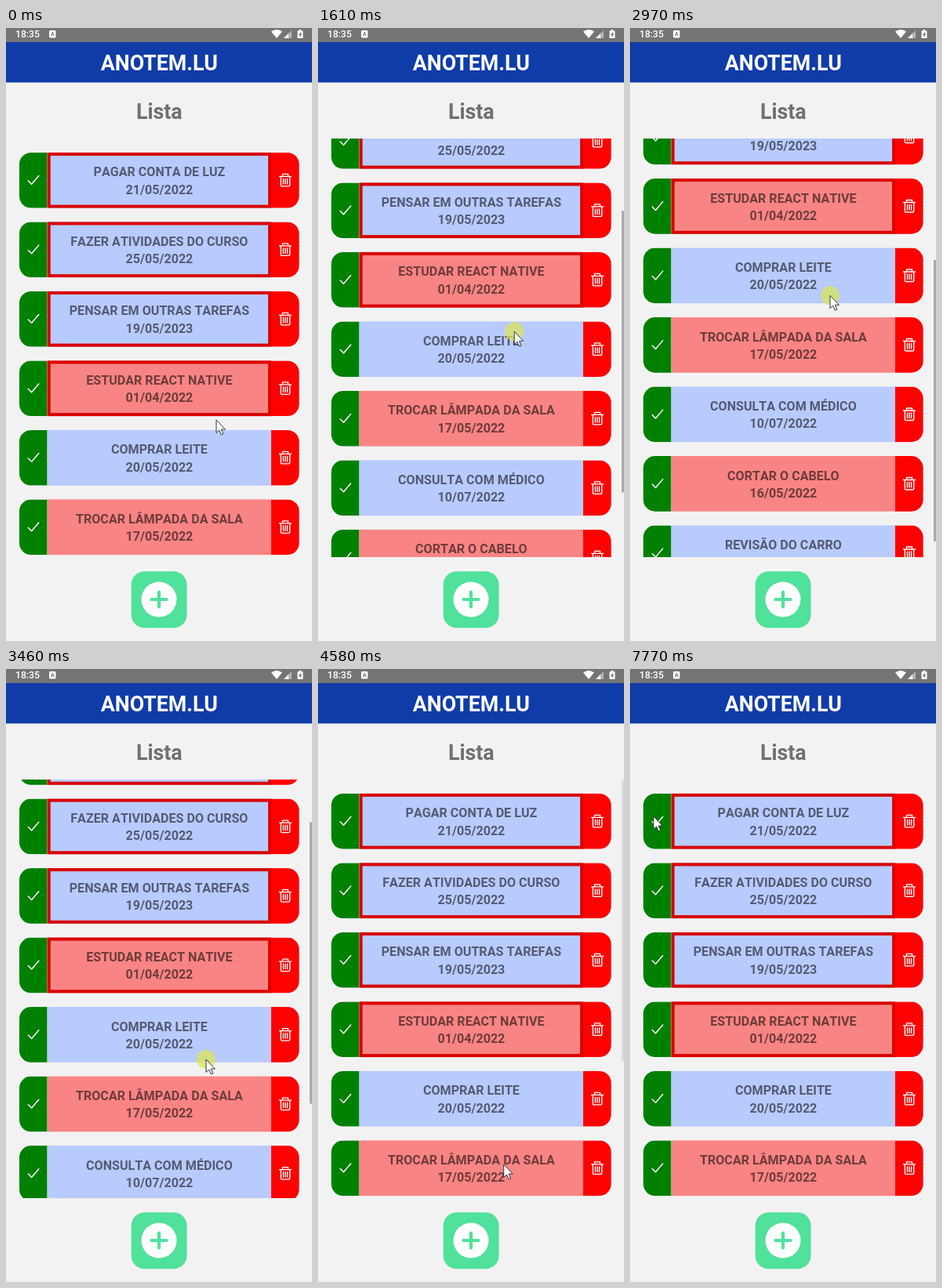
These frames come from a looping animation (390 by 782 pixels, 8 s). An HTML page:

```html
<!DOCTYPE html>
<html lang="pt-BR">
<head>
<meta charset="utf-8">
<title>Lista</title>
<style>
  html, body { margin: 0; width: 100%; height: 100%; overflow: hidden; background: #f2f2f2; }
  svg { display: block; width: 390px; height: 782px; font-family: Roboto, Arial, sans-serif; font-weight: 700; }
  .mid { text-anchor: middle; }
  .row text { font-size: 16.1px; font-kerning: none; fill: #000; fill-opacity: .55; }
  .line { fill: none; stroke: #fff; stroke-linecap: round; stroke-linejoin: round; }
</style>
</head>
<body>
<svg viewBox="0 0 390 782">
  <defs>
    <clipPath id="view"><rect y="141" width="390" height="534"/></clipPath>
    <clipPath id="round"><rect x="17" width="356.6" height="70.7" rx="15"/></clipPath>
    <g id="buttons">
      <g clip-path="url(#round)">
        <rect x="17" width="35.5" height="71" fill="#008000"/>
        <rect x="338" width="36" height="71" fill="#f00"/>
      </g>
      <path class="line" stroke-width="1.5" d="M28.4 36L32.6 40.4L41.8 29.6"/>
      <path class="line" stroke-width="1.4" d="M348.5 30.5H363.5M352.5 30V27.5H359.5V30M350.3 31V41.5Q350.3 43 351.8 43H360.2Q361.7 43 361.7 41.5V31M353.4 33.5V40M356 33.5V40M358.6 33.5V40"/>
    </g>
  </defs>
  <rect width="390" height="782" fill="#f2f2f2"/>

  <rect width="390" height="18" fill="#757575"/>
  <g fill="#fff">
    <text x="12" y="12.3" font-size="12.2" font-weight="500">18:35</text>
    <rect x="55" y="3" width="8.5" height="9.5" rx="1.5"/>
    <path d="M338 4.5Q345 -.5 352 4.5L345 13Z"/>
    <path d="M354 13L364 3V13Z" fill-opacity=".45"/>
    <path d="M354 13L360 7V13Z"/>
    <path d="M371.5 3.5H373.5V2H376.5V3.5H378.5V13H371.5Z"/>
  </g>
  <text x="59.3" y="10.4" class="mid" font-size="7" fill="#757575">A</text>
  <path d="M375.6 4.5L373 9H374.6V12L377.2 7.6H375.6Z" fill="#757575"/>

  <rect y="18" width="390" height="51.5" fill="#103ca8"/>
  <text x="195.3" y="54" class="mid" font-size="26.8" fill="#fff">ANOTEM.LU</text>
  <text x="195.3" y="116" class="mid" font-size="26.8" fill="#707070">Lista</text>

  <g clip-path="url(#view)"><g id="list"></g></g>
  <rect id="bar" x="387" width="3" height="359" fill="#000" fill-opacity=".3"/>

  <rect x="159.6" y="693.2" width="71" height="72" rx="17" fill="#50e19b"/>
  <circle cx="195" cy="729" r="22.5" fill="#fff"/>
  <path d="M185.5 729H204.5M195 719.5V738.5" stroke="#50e19b" stroke-width="4.2" stroke-linecap="round"/>

  <g id="cursor">
    <circle id="touch" r="12" fill="#dce650" fill-opacity=".72"/>
    <path d="M0 0V16.4L3.8 13L6.4 19L8.9 17.9L6.3 12.1H11.4Z" fill="#fff" stroke="#222" stroke-width=".9"/>
  </g>
</svg>
<script>
const LOOP = 8000, START = 710, TICK = 68.3;
const TOP = 158.9, PITCH = 88.5, OUTLINED = 4, MAX_SCROLL = 262.5;
const $ = id => document.getElementById(id);

const tasks = [
  ['PAGAR CONTA DE LUZ', '21/05/2022'],
  ['FAZER ATIVIDADES DO CURSO', '25/05/2022'],
  ['PENSAR EM OUTRAS TAREFAS', '19/05/2023'],
  ['ESTUDAR REACT NATIVE', '01/04/2022', 'late'],
  ['COMPRAR LEITE', '20/05/2022'],
  ['TROCAR LÂMPADA DA SALA', '17/05/2022', 'late'],
  ['CONSULTA COM MÉDICO', '10/07/2022'],
  ['CORTAR O CABELO', '16/05/2022', 'late'],
  ['REVISÃO DO CARRO', '30/06/2022']
];

$('list').innerHTML = tasks.map(([title, date, late], i) => `
  <g class="row" transform="translate(0 ${TOP + i * PITCH})">
    <use href="#buttons"/>
    <rect x="52.7" width="285.3" height="70.7" fill="${late ? '#f98484' : '#b8cbff'}"/>
    ${i < OUTLINED ? '<rect x="54.7" y="2" width="281.4" height="66.7" fill="none" stroke="#d90000" stroke-width="4"/>' : ''}
    <text x="195.4" y="30.5" class="mid">${title}</text>
    <text x="195.4" y="52.9" class="mid">${date}</text>
  </g>`).join('');

// Moves: from tick, to tick, destination; the value rests in between
const pointerMoves = [
  [0, 6, 256, 533],
  [6, 18, 246, 283],    // drag up
  [18, 20, 255, 283],
  [30.4, 40, 255, 498], // drag down
  [40, 48.4, 247, 664],
  [54, 61, 211, 552],
  [64, 67, 346, 483],
  [72, 79, 54, 326],
  [82, 86, 62, 292],
  [88, 94, 98, 203],
  [98, 103, 30, 188]
];
const scrollMoves = [[6.3, 19, MAX_SCROLL], [31.6, 40, 81.8], [40, 44.2, 0]];

const clamp = v => Math.min(1, Math.max(0, v));

const follow = (moves, origin, n) => moves.reduce((pos, [from, to, ...dest]) => {
  const p = clamp((n - from) / (to - from));
  return pos.map((v, i) => v + (dest[i] - v) * p);
}, origin);

// 1 within the span, then fading out over the given ticks
const shown = (n, from, to, fade) => n < from ? 0 : clamp(1 - (n - to) / fade);

function draw(t) {
  const n = Math.floor((t - START) / TICK);
  const [x, y] = follow(pointerMoves, [268, 500], n);
  const [offset] = follow(scrollMoves, [0], n);
  $('list').setAttribute('transform', `translate(0 ${-offset})`);
  $('bar').setAttribute('y', 141 + offset * .667);
  $('bar').setAttribute('opacity', shown(n, 7, 25, 3) + shown(n, 31, 54, 3));
  $('cursor').setAttribute('transform', `translate(${x} ${y})`);
  $('touch').setAttribute('opacity', shown(n, 6, 18, 1) + shown(n, 31, 48, 1));
}

function frame() {
  draw(performance.now() % LOOP);
  requestAnimationFrame(frame);
}
frame();
</script>
</body>
</html>
```
